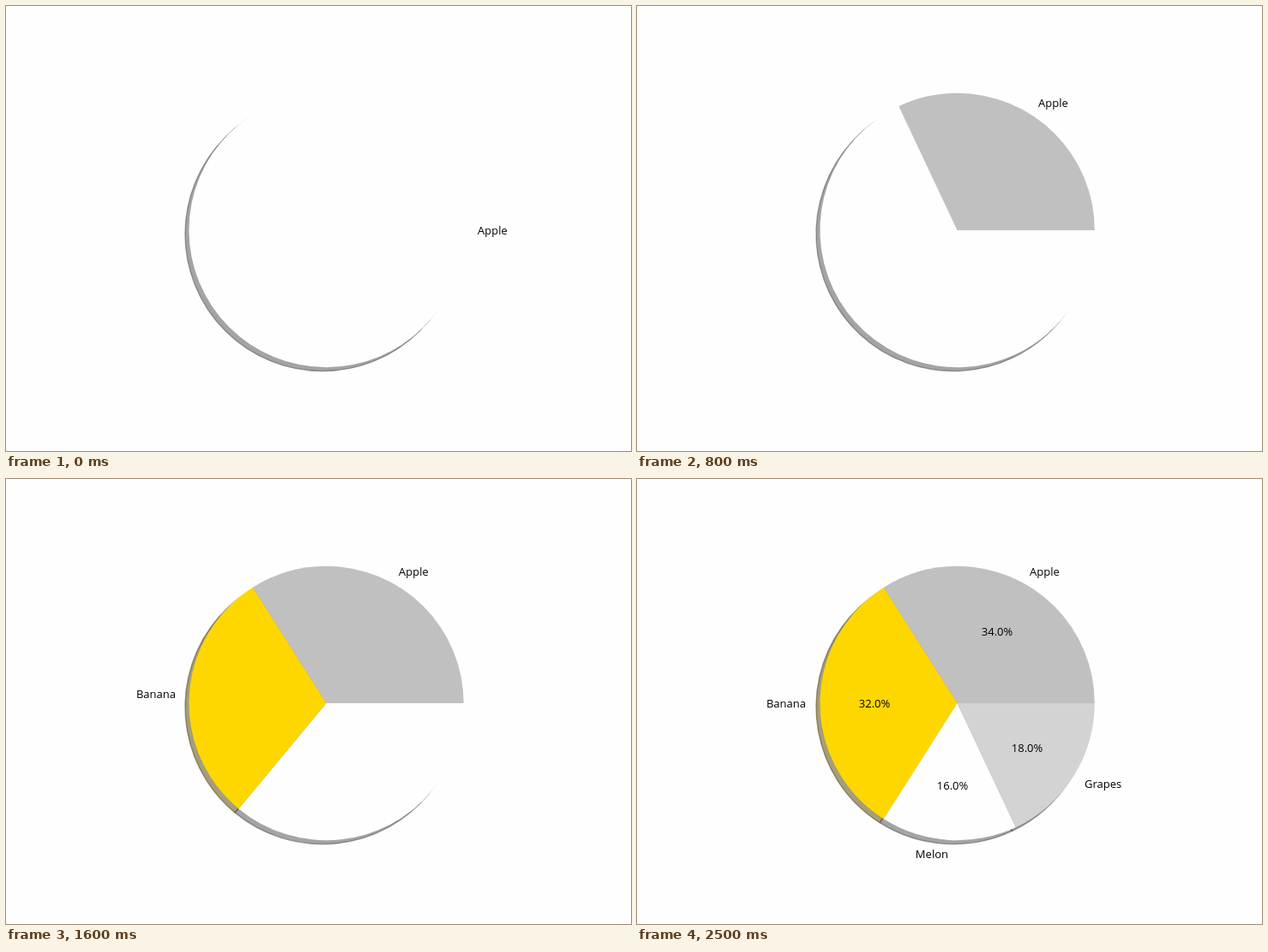
An HTML page with a canvas for the animation above (2600 ms loop, 729 by 520 pixels).

```html
<!DOCTYPE html>
<html lang="en">
<head>
<meta charset="utf-8">
<title>Fruit pie</title>
<style>
html, body { margin: 0; width: 100%; height: 100%; overflow: hidden; background: #fefefe; }
canvas { display: block; }
</style>
</head>
<body>
<canvas id="stage" width="729" height="520"></canvas>
<script>
const ctx = document.getElementById('stage').getContext('2d');
const CX = 373.6, CY = 262, R = 160.2, SHIFT = 4.45;
const STEP = 100, STEPS = 26, GROWTH = 4;
const WHITE = [254, 254, 254];
const fruits = [
  { name: 'Apple', share: 34, rgb: [192, 192, 192] },
  { name: 'Banana', share: 32, rgb: [255, 215, 0] },
  { name: 'Melon', share: 16, rgb: WHITE },
  { name: 'Grapes', share: 18, rgb: [211, 211, 211] }
];

const css = (rgb, k = 1, alpha = 1) => `rgba(${rgb.map(c => Math.round(c * k))},${alpha})`;
const angle = percent => percent / 50 * Math.PI;

function wedge(x, y, { from, to }) {
  ctx.beginPath();
  if (to - from < 100) ctx.moveTo(x, y);
  ctx.arc(x, y, R, -angle(from), -angle(to), true);
  ctx.closePath();
}

function label(text, percent, reach, align) {
  const a = angle(percent);
  const x = CX + reach * R * Math.cos(a), y = CY - reach * R * Math.sin(a);
  ctx.textAlign = align || (x > CX ? 'left' : 'right');
  ctx.fillText(text, Math.round(x), Math.round(y + 5));
}

// Fruits fill the circle one after another; a white wedge takes the rest.
function slices(total) {
  let from = 0;
  const list = fruits.map(f => {
    const to = Math.min(from + f.share, Math.max(total, from));
    const slice = { ...f, from, to };
    from = to;
    return slice;
  });
  return [...list, { name: '', rgb: WHITE, from, to: 100 }];
}

function draw(step) {
  const all = slices(step * GROWTH);
  const shown = all.filter(s => s.to > s.from);

  ctx.fillStyle = css(WHITE);
  ctx.fillRect(0, 0, 729, 520);

  ctx.lineWidth = 1.39;
  for (const s of shown) {
    wedge(CX - SHIFT, CY + SHIFT, s);
    ctx.fillStyle = ctx.strokeStyle = css(s.rgb, 0.3, 0.5);
    ctx.fill();
    ctx.stroke();
  }
  for (const s of shown) {
    wedge(CX, CY, s);
    ctx.fillStyle = css(s.rgb);
    ctx.fill();
  }

  ctx.fillStyle = '#000';
  ctx.font = '13px "Open Sans", "Noto Sans", sans-serif';
  all.forEach((s, i) => {
    const middle = (s.from + s.to) / 2;
    if (s.name && (i === 0 || s.to > s.from)) label(s.name, middle, 1.1);
    if (s.name && step === STEPS - 1) label(s.share.toFixed(1) + '%', middle, 0.6, 'center');
  });
}

const start = performance.now();
function tick() {
  draw(Math.floor((performance.now() - start) / STEP) % STEPS);
  requestAnimationFrame(tick);
}
tick();
</script>
</body>
</html>
```
